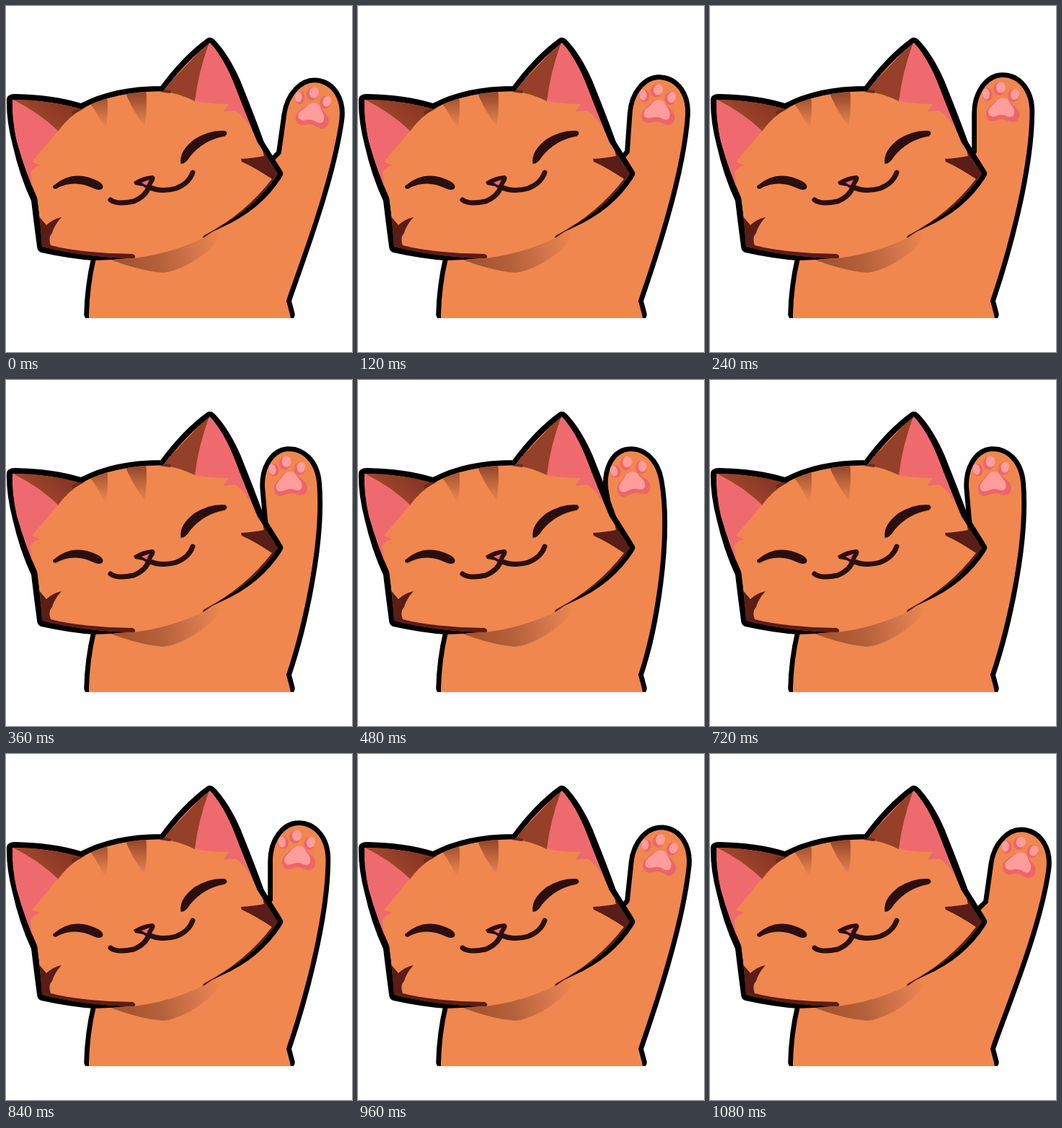
An HTML page with a canvas for the animation above (1.2 s loop, 480 by 480 pixels).

```html
<!DOCTYPE html>
<html lang="en">
<head>
<meta charset="utf-8">
<title>Waving cat</title>
<style>
html, body { margin: 0; width: 100%; height: 100%; overflow: hidden; background: #fff; }
canvas { display: block; width: 480px; height: 480px; }
</style>
</head>
<body>
<canvas id="stage" width="480" height="480"></canvas>
<script>
const ctx = document.getElementById('stage').getContext('2d');
const STEP = 120;
const FUR = '#f0874f', DARK = '#5a1d18', INK = '#2b0f10', BROWN = '#963f29';
const PINK = '#ef6a6e', PAD = '#ff9c9c', PAD_SHADE = '#ec6668';

// Paw centre x, y and tilt in degrees for each step of the wave
const POSES = [
  [425, 148, 8], [416, 144, 4], [405, 141, 0], [393, 141, -5], [380, 141, -10],
  [384, 141, -8], [393, 141, -5], [405, 141, 0], [418, 147, 6], [429, 150, 8]
];

function fill(d, color) {
  ctx.fillStyle = color;
  ctx.fill(new Path2D(d));
}

function line(d, width, color) {
  ctx.strokeStyle = color;
  ctx.lineWidth = width;
  ctx.lineCap = ctx.lineJoin = 'round';
  ctx.stroke(new Path2D(d));
}

function blob(d, color, edge) {
  fill(d, color);
  line(d, edge, color);
}

function fade(x0, y0, x1, y1, ...colors) {
  const g = ctx.createLinearGradient(x0, y0, x1, y1);
  colors.forEach((c, i) => g.addColorStop(i / (colors.length - 1), c));
  return g;
}

function oval(x, y, rx, ry, turn, color) {
  ctx.fillStyle = color;
  ctx.beginPath();
  ctx.ellipse(x, y, rx, ry, turn, 0, Math.PI * 2);
  ctx.fill();
}

function drawBody(px, py, deg) {
  const a = deg * Math.PI / 180, c = Math.cos(a), s = Math.sin(a);
  const w = 1 + Math.min(deg, 0) * 0.003;
  const at = (x, y) => {
    x *= w;
    return (px + x * c - y * s).toFixed(2) + ' ' + (py + x * s + y * c).toFixed(2);
  };
  const outline = `M394 428 L389 409 C410 348 ${at(38.5, 88)} ${at(38.5, 5)}` +
    `C${at(38.5, -23)} ${at(22, -42)} ${at(1, -42)}` +
    `C${at(-19, -42)} ${at(-35, -20)} ${at(-35, 8)}` +
    `L${at(-35, 62)} L330 260 L125 350 Q116 388 115 428`;
  ctx.save();
  ctx.beginPath();
  ctx.rect(0, 0, 480, 433);
  ctx.clip();
  line(outline, 13.5, '#000');
  fill(outline + 'L115 433 L395 433Z', FUR);
  ctx.restore();
}

function drawPads(x, y, deg) {
  ctx.save();
  ctx.translate(x, y);
  ctx.rotate(deg * Math.PI / 180);
  fill('M-22 9 C-23 1 -12 -5 -8 -10 C-2 -15 9 -14 12 -8 C14 -3 24 0 24 9 C25 19 16 22 10 19 Q1 14 -8 18 C-17 21 -22 16 -22 9Z', PAD_SHADE);
  fill('M-19 6 C-19 0 -12 -3 -8 -9 C-3 -15 7 -15 10 -9 C13 -2 18 0 17 7 C17 14 10 14 5 11 Q0 9 -6 11 C-13 14 -19 12 -19 6Z', PAD);
  oval(-20, -18, 7, 8.8, -0.1, PAD_SHADE);
  oval(-22, -19, 5, 7.5, -0.1, PAD);
  oval(-4, -26, 8, 9, 0.1, PAD_SHADE);
  oval(-1.5, -28, 6.5, 7.6, 0.1, PAD);
  oval(16, -17, 7.7, 9, 0.2, PAD_SHADE);
  oval(18, -18.5, 5.8, 7.6, 0.2, PAD);
  ctx.restore();
}

function drawHead() {
  // Neck shadow
  fill('M140 350 Q183 367 218 370 Q246 367 280 340 L312 306 L272 319 L178 346Z',
    fade(165, 350, 302, 328, '#a8552f', '#b4603a', '#d1744a', FUR));

  // Outline, tapering out under the chin
  blob('M2 129 Q3 123 12 123 Q65 124 104 136 Q150 112 215 112 Q246 70 279 46 Q284 43 289 48' +
    'Q309 69 325 106 Q344 153 357 189 L382 229 Q385 233 381 238 Q352 283 299 306' +
    'L272 319 L178 348 Q150 351 122 352 Q90 350 49 341 Q44 339 44 333 Q40 304 36 270' +
    'Q20 236 10 192 Q1 157 2 129Z', '#000', 2);

  const skull = 'M9 130 Q60 130 104 143 Q150 118 218 118 Q250 76 283 51 Q303 73 318 112' +
    'Q334 154 349 189 L377 233 Q347 278 300 304 L275 321 Q232 343 178 350' +
    'Q110 349 50 334 Q48 304 43 266 Q27 231 15 188 Q8 157 9 130Z';
  ctx.save();
  ctx.clip(new Path2D(skull));
  fill(skull, FUR);

  // Ears
  fill('M4 126 L104 140 L106 143 Q86 154 72 174 L10 133Z', fade(45, 170, 80, 130, '#a3482e', '#853522'));
  fill('M6 128 Q45 147 72 173 Q56 193 36 216 L48 221 Q38 223 34 230 L38 263 L20 240 L0 150Z', PINK);
  fill('M216 118 L283 48 L262 132 Q240 121 216 118Z', BROWN);
  fill('M283 48 Q267 90 262 132 Q286 136 309 136 L301 147 L318 145 Q330 153 341 172 L350 160 L300 60Z', PINK);

  // Forehead stripes
  const stripe = fade(0, 118, 0, 170, '#91432a', '#c2683d', FUR);
  fill('M115 133 Q129 152 138 172 Q143 148 140 122Z', stripe);
  fill('M164 116 Q174 143 192 166 Q197 142 194 114Z', stripe);
  line('M93 148 L108 140 M214 117 L227 119', 4, '#6b2a1e');

  // Cheek and jaw markings
  fill('M44 290 L56 304 Q66 295 77 293 Q67 304 64 315 Q58 321 62 332 Q105 343 176 344 Q182 347 177 351 L110 356 L44 344Z', DARK);
  fill('M326 212 Q344 211 358 208 L355 196 L386 234 L300 312 L274 324 Q271 320 277 317 Q332 288 369 240 Q345 224 327 216Z', DARK);
  ctx.restore();

  // Face
  blob('M66 250 Q94 226 128 244 Q136 249 133 253 Q130 256 121 252 Q94 239 69 253 Q65 253 66 250Z', INK, 1.5);
  blob('M243 216 Q242 201 261 186 Q283 172 304 174 Q308 177 303 180 Q274 185 255 208 Q248 219 243 218Z', INK, 1.5);
  line('M145 269 Q154 276 177 271 Q194 264 198 251 Q215 259 236 253 Q254 246 259 231', 7, INK);
  fill('M177 244 Q189 236 203 235 Q208 236 206 242 L200 252 Q194 254 190 250 L179 248Z', INK);
  fill('M188 245 L199 241 L195 249Z', PINK);
}

function frame(now) {
  const pose = POSES[Math.floor(now / STEP) % POSES.length];
  ctx.fillStyle = '#fff';
  ctx.fillRect(0, 0, 480, 480);
  drawBody(...pose);
  drawPads(...pose);
  drawHead();
}

const start = performance.now();
function tick() {
  frame(performance.now() - start);
  requestAnimationFrame(tick);
}
tick();
</script>
</body>
</html>
```
